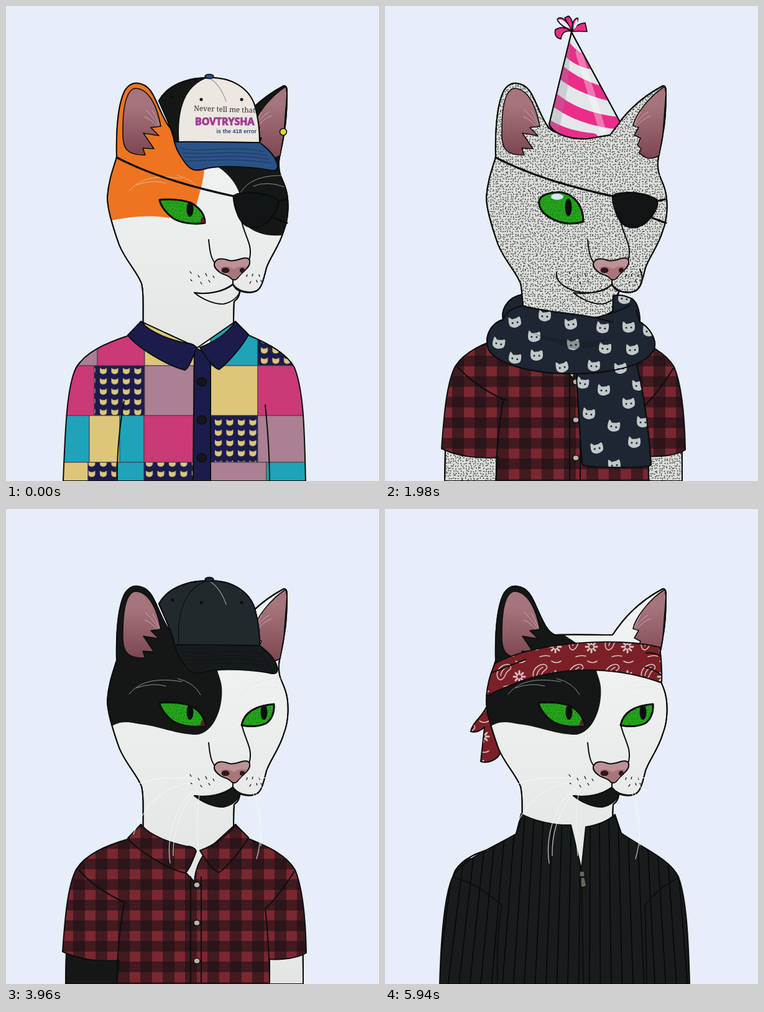
Write an HTML page that moves like this. It is 600 px wide and 762 px high and loops after 6.27 s.

```html
<!DOCTYPE html>
<html lang="en">
<head>
<meta charset="utf-8">
<title>Dressed-up cat</title>
<style>
html, body { margin: 0; width: 100%; height: 100%; overflow: hidden; background: #e7eef9 }
svg { display: block; width: 600px; height: 762px }
path, ellipse { stroke-linejoin: round; stroke-linecap: round }
</style>
</head>
<body>
<script>
const INK = '#0c0e0e', STEP = 330;

const p = (d, fill = 'none', width = 2, stroke = INK, more = '') =>
  `<path d="${d}" fill="${fill}" stroke="${stroke}" stroke-width="${width}" ${more}/>`;
const flat = (d, fill, more) => p(d, fill, 0, 'none', more);
const oval = (x, y, rx, ry = rx, fill = INK, width = 0) =>
  `<ellipse cx="${x}" cy="${y}" rx="${rx}" ry="${ry}" fill="${fill}" stroke="${INK}" stroke-width="${width}"/>`;
const box = (x, y, w, h, fill, more = '') =>
  `<rect x="${x}" y="${y}" width="${w}" height="${h}" fill="${fill}" ${more}/>`;
const clip = (name, body) => `<g clip-path="url(#c-${name})">${body}</g>`;
const pattern = (id, w, h, body) =>
  `<pattern id="${id}" width="${w}" height="${h}" patternUnits="userSpaceOnUse">${body}</pattern>`;
const gradient = (id, a, b) =>
  `<linearGradient id="${id}" x2="0" y2="1"><stop offset=".25" stop-color="${a}"/><stop offset="1" stop-color="${b}"/></linearGradient>`;

// Short strokes on a jittered grid, so that they stay evenly spread
let seed = 7;
const rand = () => (seed = (seed * 16807) % 2147483647) / 2147483647;
const specks = Array.from({ length: 900 }, (_, i) => {
  const x = (i % 30) * 4 + .8 + rand() * 2.4, y = Math.floor(i / 30) * 4 + .8 + rand() * 2.4, a = rand() * 6.28;
  return `M${x.toFixed(1)},${y.toFixed(1)}l${(Math.cos(a) * 1.2).toFixed(1)},${(Math.sin(a) * 1.2).toFixed(1)}`;
}).join('');

// Silhouettes
const HEAD = 'M221,600C219,500 223,465 218,445C210,425 192,408 182,383C172,355 163,325 163,307C165,280 172,262 178,243C177,200 180,160 190,138C196,126 205,123 212,124C232,126 238,145 247,165C255,182 262,199 274,202C305,201 335,202 366,202C382,178 405,150 447,128Q452,128 452,136C452,160 451,185 447,205C445,225 440,235 439,250C438,270 444,275 449,290C456,310 455,340 447,360C440,385 425,402 419,420C414,440 411,453 403,457C395,461 385,460 376,457C376,468 370,472 367,474C365,500 366,520 367,600';
const BARE = 'M200,535C155,550 128,556 113,580C99,610 97,690 96,762H478C478,690 477,610 463,582C452,562 425,550 386,535Z';
const LONG = 'M217,506C206,522 200,528 196,529C160,541 128,555 113,580C97,610 95,690 92,762H482C480,690 480,620 464,580C452,558 425,543 390,528L369,506L308,548Z';
const SHORT = 'M217,506L198,529C160,540 128,554 113,578C99,605 95,655 91,710C115,722 150,727 182,724L178,762H424V722C445,724 470,720 483,712C482,660 478,610 465,579C452,556 425,543 388,528L369,506L325,546Q305,568 303,598Z';
const KNIT = 'M219,489C240,501 275,508 299,507L316,578L323,510C342,507 358,501 370,490L380,520C420,547 458,562 472,590C485,625 488,690 490,762H88C90,690 95,620 109,590C128,560 170,545 211,521Z';
const CROWN = 'M246,152C256,133 282,115 326,115C370,114 395,138 401,163C407,185 408,200 408,219L271,218C268,200 258,180 246,152Z';
const BRIM = 'M271,218C300,217 380,219 408,219C420,228 434,240 437,256Q437,265 428,264C400,258 350,255 325,260C305,266 298,264 290,254C282,243 274,232 271,218Z';
const CONE = 'M300,42C288,90 274,150 264,190C272,207 300,214 325,213L362,207L378,186Z';
const BAND = 'M177,248C240,212 380,205 442,222Q446,250 445,279C380,255 300,250 225,274C200,283 180,292 163,300C165,280 170,262 177,248Z';
const TAIL = 'M308,585C310,640 314,690 317,735Q320,740 370,740Q425,741 428,736C425,690 418,630 404,570Z';
const WRAP = 'M220,463C194,468 187,490 190,503C168,510 160,532 166,550C178,574 235,590 300,590C360,590 422,578 433,550C438,535 425,515 410,507C410,490 405,470 393,468Q380,462 367,465V489Q354,498 338,500C310,494 250,490 222,481Z';
const CHIN = 'M303,460C315,470 335,479 350,478C365,475 375,465 376,457Q370,456 365,447C350,459 325,463 303,460Z';
const MEAN_L = 'M247,311C265,309 285,311 298,316C312,324 320,335 320,348C300,351 280,348 268,340C255,330 248,318 247,311Z';
const MEAN_R = 'M379,347C382,330 395,316 431,313C432,325 428,338 418,344C405,350 390,349 379,347Z';
const ROUND_L = 'M248,312C251,302 268,298 284,299C306,303 319,322 319,346C306,350 290,350 277,345C258,338 246,326 248,312Z';
const CAT = 'M-9,-9Q-7,-9 -4,-5L4,-6Q8,-9 9,-7Q11,0 9,5Q6,8 0,9Q-6,9 -9,5Q-11,0 -9,-9Z';

const defs = '<defs>' +
  Object.entries({ head: HEAD, bare: BARE, long: LONG, knit: KNIT, crown: CROWN, cone: CONE, scarf: WRAP + TAIL })
    .map(([id, d]) => `<clipPath id="c-${id}"><path d="${d}"/></clipPath>`).join('') +
  gradient('white', '#f0f2f2', '#e2e5e2') + gradient('pink', '#a6747c', '#7c4650') +
  pattern('speck', 120, 120, box(0, 0, 120, 120, '#dbddd9') + p(specks, 'none', 1.3, '#3a3b3a')) +
  pattern('eyespeck', 120, 120, p(specks, 'none', 1.3, '#123010')) +
  pattern('plaid', 36, 33, box(0, 0, 36, 33, '#7a2730') +
    box(0, 0, 19, 33, '#1c1015', 'opacity=".6"') + box(0, 0, 36, 17, '#1c1015', 'opacity=".6"')) +
  pattern('pin', 4.5, 9, box(0, 0, 5, 9, '#e6e1dd') + box(0, 0, 1.2, 9, '#cda0b0')) +
  pattern('cats', 18.5, 16.5, box(0, 0, 19, 17, '#1b1c4c') + flat('M3,3l3,2h5l3-2v6q-1,4-5.5,4q-5,0-5.5-4z', '#dcc67a')) +
  pattern('paisley', 58, 48, box(0, 0, 58, 48, '#7c2027') +
    p('M7,30C2,14 24,4 28,12C31,18 22,18 20,25C17,34 10,37 7,30ZM12,27Q14,17 22,14M36,4q8,5 15,0M33,44q-8-2-16,1', 'none', 1.6, '#d6c3c4') +
    p('M42,20v18M33,29h18M36,23l12,12M48,23l-12,12', 'none', 3, '#d6c3c4') +
    oval(42, 29, 3, 3, '#7c2027')) +
  '</defs>';

// Fur
const EARS =
  p('M208,132C192,135 188,165 188,200C187,226 192,240 224,239L220,228L238,229L221,204L246,208L233,195L249,193C244,165 232,133 208,132Z', 'url(#pink)', 1.6) +
  p('M450,129C425,145 402,175 399,192L408,195L401,207L411,212L406,223L412,229L409,236L419,243C428,246 437,243 441,240L447,205L452,140Z', 'url(#pink)', 1.6) +
  p('M246,192Q236,177 224,166M243,193Q231,180 223,178M247,190L236,168M402,192Q408,180 423,170M404,194Q414,181 427,176M401,190L411,170', 'none', .8, '#d5bcc0');
const coats = {
  calico: ['url(#white)',
    flat('M160,346C200,337 235,335 262,340L306,322C308,308 316,292 319,262V100H150Z', '#ee7420') +
    flat('M316,247C346,255 368,278 376,302L385,350C400,366 425,371 450,367L480,330V120H370L350,200Z', '#141716'),
    flat('M422,545C468,560 478,620 478,704C450,700 430,680 420,660Z', '#141716')],
  speckle: ['url(#speck)', '', ''],
  tux: ['url(#white)',
    flat('M160,356C180,338 195,341 215,345C250,349 275,362 308,362C335,358 350,318 347,285C345,268 338,262 340,250C330,225 302,212 285,200L260,100H150Z', '#141716'),
    box(90, 560, 91, 202, '#141716')],
};
const brows = p('M198,297C215,277 240,270 283,277M210,287Q235,278 257,284M276,272Q302,278 313,298M377,300C388,281 410,271 447,272M398,289Q420,280 447,290', 'none', 1, '#dfe1df', 'opacity=".6"');
const face = ([fill, marks], tux, smile) =>
  p(HEAD, fill) + clip('head', marks) + p(HEAD) + EARS + brows +
  p('M326,375C328,395 330,405 336,412M379,345C382,360 388,370 392,385C394,395 393,402 391,408') +
  p(CHIN, tux ? '#141716' : 'none', 1.8) +
  (smile ? p('M276,428C273,445 300,460 325,460C345,460 358,455 365,446C372,457 385,460 397,459C412,455 418,440 410,422')
    : p('M303,460C325,463 350,458 365,446C372,457 390,462 403,457')) +
  p('M335,413C338,405 345,404 355,407C363,411 372,407 380,405C388,403 393,405 392,412C392,420 378,428 373,436Q367,442 362,437C358,432 352,432 345,428C337,422 334,418 335,413Z', '#bd9296') +
  flat('M345,420Q355,414 366,422Q378,415 388,419L370,438Q364,440 358,431Z', '#a8757b') +
  oval(353, 424, 6.5, 4.5, '#2c191c') + oval(380, 424, 4, 4, '#2c191c') + p('M365,440V447') +
  p('M296,426l2,3M309,432l2,3M321,429l2,4M333,433l2,3M297,439l2,2M313,443l2,3M326,440l2,3M388,431l-1,3M397,430l-1,3M407,431l1,3M394,442l-2,3M403,440l1,3M410,440l1,2', 'none', 1.3);

// Eyes
const iris = (d, x, y, ry, colour) => p(d, colour) + flat(d, 'url(#eyespeck)', 'opacity=".35"') + oval(x, y, 5.5, ry) + p(d, 'none', 3);
const eyes = {
  mean: (c, patch) => iris(MEAN_L, 296, 326, 12, c) + flat('M315,338Q320,341 320,348L312,348Z', '#5a2025') + (patch ? '' : iris(MEAN_R, 415, 326, 12, c)),
  round: (c, patch) => iris(ROUND_L, 295, 323, 14, c) + oval(277, 306, 10, 5, '#cfeaf2') + (patch ? '' : iris(MEAN_R, 415, 326, 12, c)),
  shut: (c, patch) => p('M248,314C272,308 300,311 319,337') + (patch ? '' : p('M431,315C410,310 388,320 380,334Q377,340 380,350')),
};
const eyePatch = p('M178,243C240,275 310,293 370,306', 'none', 3.2) +
  p('M437,313L452,310M430,340L452,348', 'none', 3) +
  p('M366,305Q371,301 383,300C404,298 424,303 436,310C442,316 434,332 425,342C416,352 405,356 395,355C382,353 376,343 372,332Q367,320 366,305Z', '#101516', 3);

// Clothes
const seams = p('M179,762C178,715 184,665 190,634M424,762C424,720 420,670 417,640');
const sleeves = p('M115,577C140,605 170,622 193,632M464,581Q440,619 419,640');
const buttons = (x, rx, fill) => [603, 664, 725].map(y => oval(x, y, rx, rx * .9, fill, 1.5)).join('');
const collar = fill => p('M217,506L196,528C210,548 260,577 288,584Q295,580 306,549Q303,541 290,541C262,535 230,523 217,506Z', fill) +
  p('M369,506L390,527C382,543 358,572 343,583Q333,582 312,548C332,540 355,528 369,506Z', fill);
const [TEAL, PINK, MAUVE, SAND, NAVY] = ['#1fa3b8', '#cb3977', '#aa8092', '#dcc67a', '#1b1c4c'];
const quiltRow = (y, h, cells) => cells.map(([x, w, fill]) => box(x, y, w, h, fill, 'stroke="#4a3a48"')).join('');
const clothes = {
  none: () => p('M198,567C207,620 202,660 181,688M190,568C199,620 196,655 183,678') +
    flat('M199,566C207,620 202,660 181,688L178,762H424V570L313,640C270,640 230,620 219,575Z', '#dadcda') +
    p('M219,576C230,615 270,642 313,643M226,576C238,610 272,634 313,637') + oval(304, 690, 34, 17, '#c8cac9') + seams,
  quilt: () => clip('long',
    quiltRow(500, 77, [[90, 57, MAUVE], [147, 76, PINK], [223, 80, SAND], [329, 76, TEAL], [405, 90, 'url(#cats)']]) +
    quiltRow(577, 80, [[90, 52, PINK], [142, 81, 'url(#cats)'], [223, 79, MAUVE], [329, 76, SAND], [405, 90, PINK]]) +
    quiltRow(657, 75, [[90, 44, TEAL], [134, 49, SAND], [183, 39, TEAL], [222, 79, PINK], [329, 76, 'url(#cats)'], [405, 90, MAUVE]]) +
    quiltRow(732, 40, [[90, 42, SAND], [132, 46, 'url(#cats)'], [178, 44, TEAL], [222, 79, 'url(#cats)'], [329, 90, MAUVE], [419, 80, TEAL]]) +
    p('M303,548L329,560V764H301Z', NAVY)) + p(LONG) + seams + collar(NAVY) + buttons(315, 7.5, '#15151a'),
  plaid: () => p(SHORT, 'url(#plaid)') + seams + sleeves + p('M297,590V762M314,590V762') +
    collar('url(#plaid)') + buttons(307, 5, '#b8b3ae'),
  overalls: () => p(SHORT, 'url(#pin)') + sleeves + p('M308,598V670') +
    p('M186,548L205,668L229,668L217,545ZM385,532Q397,520 411,536L409,668H385Z', '#4c648c') +
    p('M372,505L388,529C372,553 350,567 333,576L325,546C345,535 360,520 372,505Z', 'url(#pin)') +
    p('M205,662C250,670 360,672 410,664L424,690V762H176C185,735 195,690 205,662Z', '#4c648c') + p('M239,762V714Q239,709 245,709H390V762') +
    p('M196,612L227,610L228,634L199,636Z', '#e6e1dd') +
    p('M90,678C120,690 155,690 185,692Q187,715 183,726C150,726 110,720 89,711Z', 'url(#pin)') + p('M100,689Q125,691 151,699') +
    p('M426,691C450,691 470,688 484,683Q487,700 485,714C465,722 440,724 426,724Z', 'url(#pin)'),
  knit: () => p(KNIT, '#171c1d') +
    clip('knit', Array.from({ length: 24 }, (_, i) => `M${84 + i * 18 + (12 - i) * 3},490L${84 + i * 17.5},762`)
      .map(d => p(d, 'none', 1.6, '#060808')).join('')) +
    p('M109,591C140,597 168,618 188,636C181,670 180,720 181,762M472,592C448,602 432,618 418,636C420,680 420,720 421,762M316,578L319,762M211,521Q217,505 219,495M380,520L370,495') +
    p('M313,581h8v9h-8ZM315,591h6l3,13q-5,5 -9,1Z', '#66675a', 1.3),
};

const scarfCats = [209,507, 257,497, 299,510, 350,516, 392,515, 183,541, 240,530, 303,543, 354,549, 398,551, 209,565, 244,560, 285,579, 336,577, 379,581, 385,469, 425,521, 318,605, 352,616, 408,608, 328,654, 392,637, 368,674, 415,667, 341,709, 401,700, 369,736];
const scarf = fill => {
  const light = fill === PINE ? '#c9dfd4' : '#c0c8c7';
  const cats = scarfCats.map((x, i) => i % 2 ? '' :
    `<g transform="translate(${x} ${scarfCats[i + 1]}) rotate(${(i * 7) % 24 - 10})">${flat(CAT, light)}${oval(-4, 1, 1.5, 1.5, fill)}${oval(4, 1, 1.5, 1.5, fill)}</g>`).join('');
  return p(TAIL, fill) + p(WRAP, fill) +
    clip('scarf', cats) + flat('M225,520C260,535 315,540 360,535Q320,560 285,545Z', '#10151a', 'opacity=".3"') +
    p(WRAP) + p('M308,590C310,640 314,690 317,735Q320,740 370,740Q425,741 428,736C425,690 418,630 406,580') +
    p('M190,503Q196,485 222,481M338,500L366,507M338,500Q380,490 395,479M410,507Q405,495 404,488');
};

// Hats
const cap = (side, front, right, brim, art = '') =>
  p(CROWN, side) + clip('crown',
    flat('M278,219C275,175 282,128 326,114L410,150V219Z', front) + flat('M326,114C352,125 361,175 360,219H412V110Z', right) +
    p('M278,219C275,175 282,128 326,114', 'none', 1.2) + art) + p(CROWN) + p(BRIM, brim) +
  [0, 1, 2, 3].map(i => p(`M${281 + i * 3},${228 + i * 7}C310,${237 + i * 4} 370,${222 + i * 7} ${415 + i * 4},${234 + i * 6}`, 'none', .7, INK, 'opacity=".6"')).join('') +
  oval(268, 146, 2.5) + oval(314, 150, 2.5) + oval(379, 150, 2.5);
const knob = fill => oval(327, 113, 7, 3.5, fill, 1.5);
const seam = p('M326,115C340,123 349,138 354,153', 'none', 1.2, '#9b9690');
const write = (x, y, size, fill, font, text, more = '') =>
  `<text x="${x}" y="${y}" font-size="${size}" fill="${fill}" font-family="${font}" ${more}>${text}</text>`;
const tails = fill => p('M163,318C155,335 140,343 138,357Q149,360 160,350L154,405C165,409 181,403 187,389L165,330Z', fill);

const hats = {
  none: '',
  slogan: cap('#141716', '#ece7e0', '#ece7e0', '#2a5288', seam +
    write(302, 168, 11.6, '#302b2b', "'Noto Serif', serif", 'Never tell me that', 'transform="rotate(2 302 168)"') +
    write(304, 191, 16, '#a23d94', "'Open Sans', sans-serif", 'BOVTRYSHA', 'font-weight="700" stroke="#a23d94"') +
    write(403, 204, 9, '#2a4a80', "'Liberation Sans', sans-serif", 'is the 418 error', 'font-weight="bold" text-anchor="end"')) +
    knob('#2a5288') + oval(446, 202, 5.5, 5.5, '#e4cf4a', 1.5),
  tan: cap('#cfc1b1', '#cfc1b1', '#cfc1b1', '#141819', seam + oval(357, 179, 14, 14, '#8f99be') +
    write(360, 202, 9.5, '#222', "'Lato', sans-serif", 'Bovtrysha', 'text-anchor="middle" font-style="italic" font-weight="bold"')) + knob('#141819'),
  propeller: cap('#b4092c', '#3e7dab', '#d3cfd0', '#1a6f43') + [111, 104, 97].map((y, i) => oval(326, y, 4, 4, ['#dfd08a', '#7fc3a5', '#8fa9d6'][i], 1.2)).join('') +
    p('M326,92C300,100 268,104 258,96C254,86 300,80 326,90C350,80 386,76 392,86C394,96 350,97 326,92ZM326,86V94', '#1ca747'),
  party: p(CONE, '#e3e7e9') + clip('cone',
    ['M286,60Q302,86 334,92', 'M276,100Q308,130 364,143', 'M264,143Q308,184 388,189', 'M252,186Q286,210 334,214'].map(d => p(d, 'none', 20, '#e92d89')).join('') +
    flat('M300,42L264,190L278,210L294,130Z', '#89939a', 'opacity=".3"') + p('M312,75L350,200', 'none', 11, '#fff', 'opacity=".35"')) + p(CONE) +
    p('M301,41Q285,37 283,53Q271,50 274,38Q286,30 301,41Q279,30 277,21Q287,12 301,41Q313,40 325,41L322,27Q308,28 301,41Q312,25 310,19Q300,21 301,41Q304,22 295,16L289,19Q294,28 301,41', '#e92d89', 1.6) +
    flat('M278,22Q288,19 298,36Q284,32 278,22ZM303,38Q304,25 309,21Q313,30 303,38Z', '#f0f2f4'),
  pirate: p('M176,250C240,231 380,230 441,241L445,268C380,240 250,246 164,290Q168,265 176,250Z', '#5b1a20') + p('M172,262Q200,253 229,244M440,257Q430,250 412,247') +
    p('M174,251C170,225 158,218 145,203C135,194 135,184 136,180C140,202 165,206 190,188C232,160 245,70 300,54C340,46 372,62 395,100C412,135 422,165 445,190C462,208 477,203 478,188Q478,200 460,212C448,222 443,230 442,241C380,230 250,228 174,251Z', '#172023') +
    ['none', '#d2a23d'].map((c, i) => p('M136,180C140,202 165,206 190,188C232,160 245,70 300,54C340,46 372,62 395,100C412,135 422,165 445,190C462,208 477,203 478,188', 'none', i ? 3.5 : 6, i ? c : INK)).join('') +
    flat('M286,122C300,108 320,99 339,94Q322,122 338,148C316,146 295,137 286,122Z', '#a9abab') + oval(313, 121, 7, 7, '#172023') +
    p('M328,121H365M336,110L332,121L341,132M349,111L344,121L353,130M360,113L355,121L361,128M370,112L364,121L370,129', 'none', 4, '#a9abab') +
    p('M328,164L347,184M347,165L326,183', 'none', 2.5),
  bandana: p(BAND, 'url(#paisley)') + p('M173,262Q198,253 226,241M420,231Q434,230 442,236M418,254Q433,257 444,266'),
  straw: p('M54,213C75,245 160,216 220,225H400C460,216 540,245 565,212C555,272 440,262 310,262C180,262 65,275 54,213Z', '#d8b66c') +
    p('M207,232C225,135 258,70 310,70C362,70 395,135 413,232Q310,255 207,232Z', '#d8b66c') + p('M211,219Q310,240 409,219', 'none', 12, '#9b2f32'),
  dark: cap('#22292d', '#22292d', '#22292d', '#151a1c', seam) + knob('#22292d'),
};
const behind = {
  pirate: tails('#5b1a20') + p('M136,182C136,155 160,143 178,146L214,150L200,188C180,202 145,203 136,182ZM478,190C480,170 460,150 440,152L420,165L448,194Q470,207 478,190Z', '#121819', 6) +
    p('M136,182C136,155 160,143 178,146L200,188C180,202 145,203 136,182ZM478,190C480,170 460,150 440,152L448,194Q470,207 478,190Z', '#121819', 3, '#d2a23d'),
  bandana: tails('url(#paisley)'),
};

const whiskers = p('M300,432Q245,428 213,441M305,437C250,445 220,480 205,522M308,446C270,475 258,530 264,568M308,450C280,480 268,520 269,556M312,452Q304,500 310,556M405,432L420,431M408,445L423,453M402,455Q416,520 403,561M398,457Q411,500 410,540', 'none', 1.3, '#f4f6f7', 'opacity=".75"');
const duck = '<g opacity=".95">' +
  p('M130,592C105,570 92,540 93,500C95,445 140,408 200,409C265,409 308,455 307,510C306,545 290,570 284,590Q286,600 300,602C360,605 450,603 480,614C505,625 515,650 515,672C515,700 495,730 470,738C400,747 200,748 125,738C85,733 56,700 55,665C57,630 90,605 130,592Z', '#e2d923') +
  flat('M205,412C300,420 320,510 282,592C330,605 420,606 450,607L440,742H190L205,620Z', '#c9c21c', 'opacity=".4"') +
  flat('M188,668H420L410,740H178ZM190,605L228,620L240,668H194Z', '#bdb60f', 'opacity=".3"') + '</g>' +
  flat('M118,488C112,460 140,430 172,432Q180,448 153,461Q140,478 118,488ZM179,430Q195,412 211,430Q210,446 195,445Z', '#f0ea7c', 'opacity=".55"') +
  oval(122, 471, 9, 11, '#343a3e') + oval(242, 470, 13, 11) +
  p('M133,537C132,525 145,513 160,514C180,512 205,510 210,523C212,540 195,553 175,558C160,560 148,562 143,553L146,545C138,545 133,542 133,537Z', '#e07d25') + p('M146,545Q180,546 200,535') +
  oval(155, 528, 5, 4, '#b8641c') + oval(175, 526, 6, 4, '#b8641c') +
  p('M122,588Q137,594 150,594', 'none', 1.5) + p('M99,690L144,694M314,699H455M57,680Q72,690 90,692M455,699Q500,694 514,680', 'none', 1.4, '#8f8b15') +
  p('M490,637L499,629Q507,627 505,635L496,643Q488,643 490,637Z', '#d9da78', 1.5);

const GREEN = '#24a51b', BLUE = '#36a0c4', PINE = '#1d5638', SLATE = '#1e2633';
function scene([coat, eye, colour, hat, top, extras = '', shade]) {
  const has = word => extras.includes(word), fur = coats[coat];
  return box(0, 0, 600, 762, '#e7eef9') + (behind[hat] || '') +
    p(BARE, fur[0]) + clip('bare', fur[2]) + p(BARE) + seams +
    face(fur, coat === 'tux', has('smile')) + eyes[eye](colour, has('patch')) + (has('patch') ? eyePatch : '') +
    clothes[top]() + (shade ? scarf(shade) : '') + (has('whisk') ? whiskers : '') + (has('duck') ? duck : '') + hats[hat];
}

// coat, eyes, eye colour, hat, clothes, extras, scarf colour
const looks = [
  ['calico', 'mean', GREEN, 'slogan', 'quilt', 'patch'],
  ['calico', 'mean', GREEN, 'straw', 'plaid', 'patch'],
  ['calico', 'mean', GREEN, 'pirate', 'none', 'patch whisk', PINE],
  ['calico', 'shut', GREEN, 'straw', 'quilt', 'smile'],
  ['calico', 'mean', BLUE, 'tan', 'overalls', ''],
  ['speckle', 'mean', GREEN, 'slogan', 'quilt', 'smile'],
  ['speckle', 'round', GREEN, 'party', 'plaid', 'patch smile', SLATE],
  ['speckle', 'mean', BLUE, 'none', 'quilt', 'smile'],
  ['speckle', 'shut', GREEN, 'none', 'plaid', 'whisk'],
  ['speckle', 'shut', GREEN, 'propeller', 'knit', 'patch smile whisk', SLATE],
  ['speckle', 'mean', GREEN, 'dark', 'knit', ''],
  ['speckle', 'mean', BLUE, 'none', 'overalls', 'duck'],
  ['tux', 'mean', GREEN, 'dark', 'plaid', 'whisk'],
  ['tux', 'mean', BLUE, 'propeller', 'quilt', 'smile duck'],
  ['tux', 'shut', GREEN, 'tan', 'overalls', 'smile', PINE],
  ['tux', 'mean', GREEN, 'none', 'quilt', 'smile'],
  ['tux', 'mean', BLUE, 'none', 'plaid', ''],
  ['tux', 'mean', GREEN, 'slogan', 'knit', 'smile'],
  ['tux', 'mean', GREEN, 'bandana', 'knit', 'whisk'],
];

document.body.innerHTML = `<svg viewBox="0 0 600 762">${defs}${looks.map(look => `<g class="look" display="none">${scene(look)}</g>`).join('')}</svg>`;
const layers = document.querySelectorAll('.look');
let shown;
function draw() {
  const now = Math.floor(performance.now() / STEP) % looks.length;
  if (now !== shown) {
    layers.forEach((layer, i) => layer.setAttribute('display', i === now ? 'inline' : 'none'));
    shown = now;
  }
  requestAnimationFrame(draw);
}
draw();
</script>
</body>
</html>
```
